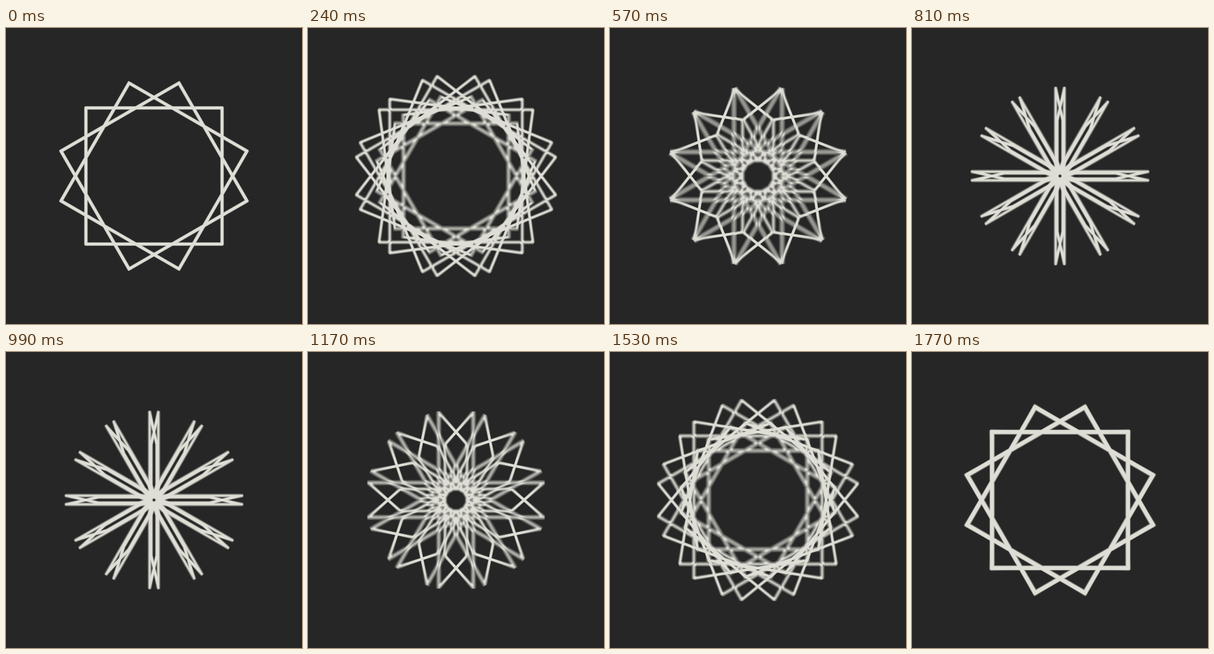
Animation, 400 px wide and 400 px high, one loop 1.8 s. Source, as an HTML page with a canvas:

```html
<!DOCTYPE html>
<html lang="en">
<head>
<meta charset="utf-8">
<title>Tilting squares</title>
<style>
  html, body { margin: 0; width: 100%; height: 100%; overflow: hidden; background: #262626; }
  canvas { display: block; }
</style>
</head>
<body>
<canvas id="stage" width="400" height="400"></canvas>
<script>
const ctx = document.getElementById('stage').getContext('2d');
const LOOP = 1800, STEP = 30;
const HALF = 92, CAMERA = 405, COUNT = 12;
const SHUTTER = 36, SAMPLES = 8;
const CORNERS = [[-1, -1], [1, -1], [1, 1], [-1, 1]];

// Half a turn per loop, slowing down where the squares are edge-on.
function tilt(t) {
  const a = 2 * Math.PI * t / LOOP;
  const degrees = 180 * t / LOOP
    + 15 * Math.sin(a) - 4 * Math.sin(2 * a) - Math.sin(3 * a);
  return degrees * Math.PI / 180;
}

function addSquare(angle, theta) {
  const c = Math.cos(angle), s = Math.sin(angle);
  CORNERS.forEach(([i, j], n) => {
    const zoom = HALF * CAMERA / (CAMERA - HALF * j * Math.sin(theta));
    const x = i * zoom, y = j * Math.cos(theta) * zoom;
    ctx[n ? 'lineTo' : 'moveTo'](x * c - y * s, x * s + y * c);
  });
  ctx.closePath();
}

function drawSquares(theta) {
  ctx.beginPath();
  for (let k = 0; k < COUNT; k++) addSquare(k * 2 * Math.PI / COUNT, theta);
  ctx.stroke();
}

// Adds up several faint moments to give motion blur.
function draw(t) {
  ctx.setTransform(1, 0, 0, 1, 0, 0);
  ctx.globalCompositeOperation = 'source-over';
  ctx.fillStyle = '#262626';
  ctx.fillRect(0, 0, 400, 400);

  ctx.translate(200, 200);
  ctx.globalCompositeOperation = 'lighter';
  ctx.strokeStyle = 'rgb(23, 23, 22)';
  ctx.lineWidth = 3.6;
  ctx.lineJoin = 'round';
  for (let n = 0; n < SAMPLES; n++) {
    drawSquares(tilt(t + SHUTTER * ((n + 0.5) / SAMPLES - 0.5)));
  }
}

const start = performance.now();
function frame() {
  const t = (performance.now() - start) % LOOP;
  draw(Math.floor(t / STEP) * STEP);
  requestAnimationFrame(frame);
}
frame();
</script>
</body>
</html>
```
